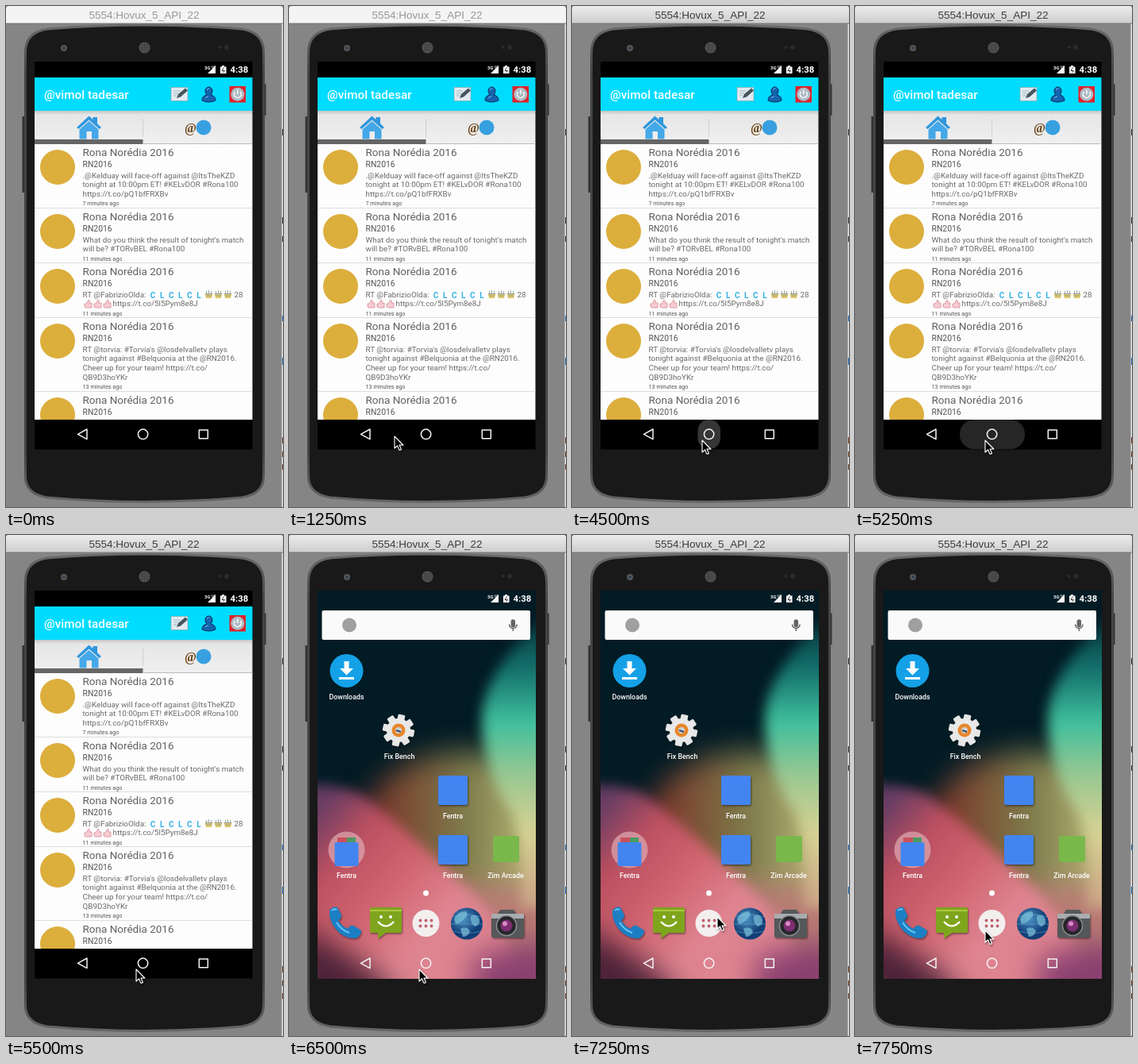
Write an HTML page that moves like this. It is 349 px wide and 631 px high and loops after 8000 ms.

```html
<!DOCTYPE html>
<html lang="en">
<head>
<meta charset="utf-8">
<title>Phone emulator</title>
<style>
html, body { margin: 0; width: 100%; height: 100%; overflow: hidden; background: #858585; }
svg { display: block; width: 349px; height: 631px; }
text { font-family: Roboto, sans-serif; white-space: pre; }
.window-title { font: 13.5px "Liberation Sans", Arial, sans-serif; text-anchor: middle; }
.name { font-size: 13.5px; fill: #616161; }
.handle { font-size: 10.4px; fill: #555; }
.body { font-size: 9.85px; fill: #6a6a6a; }
.time { font-size: 7.25px; fill: #555; }
.label { font-size: 8.9px; font-weight: 500; fill: #fff; text-anchor: middle; }
.blur { filter: url(#soft); }
.haze { filter: url(#softer); }

.active, .home, .tap, .spread, #cursor { animation: 8s step-end infinite; }
.active { animation-name: active; }
.home { animation-name: home; }
.tap { animation-name: tap; }
.spread { animation-name: spread; }
#cursor { animation-name: move; }

@keyframes active { 0% { opacity: 0 } 25%, 100% { opacity: 1 } }
@keyframes home { 0% { opacity: 0 } 81.25%, 100% { opacity: 1 } }
@keyframes tap { 0% { opacity: 0 } 56.25% { opacity: 1 } 59.375%, 100% { opacity: 0 } }
@keyframes spread { 0% { opacity: 0 } 65.625% { opacity: 1 } 68.75%, 100% { opacity: 0 } }
@keyframes move {
  0% { transform: translate(-40px, -40px) }
  3.125% { transform: translate(62px, 352px) }
  6.25% { transform: translate(58px, 602px) }
  9.375% { transform: translate(102px, 501px) }
  12.5% { transform: translate(86px, 547px) }
  15.625% { transform: translate(133px, 542px) }
  18.75% { transform: translate(149px, 543px) }
  21.875% { transform: translate(162px, 545px) }
  25% { transform: translate(164px, 547px) }
  90.625% { transform: translate(183px, 481px) }
  93.75% { transform: translate(165px, 497px) }
  96.875%, 100% { transform: translate(164px, 498px) }
}
</style>
</head>
<body>
<svg viewBox="0 0 349 631">
  <defs>
    <linearGradient id="bar" x2="0" y2="1"><stop stop-color="#ececec"/><stop offset="1" stop-color="#cdcdcd"/></linearGradient>
    <linearGradient id="tabs" x2="0" y2="1"><stop stop-color="#c4c4c4"/><stop offset=".12" stop-color="#e6e6e6"/><stop offset="1" stop-color="#f0f0f0"/></linearGradient>
    <linearGradient id="rim" x2="0" y2="1"><stop stop-color="#6a6a6a"/><stop offset=".1" stop-color="#444"/><stop offset=".9" stop-color="#444"/><stop offset="1" stop-color="#666"/></linearGradient>
    <linearGradient id="olive" gradientUnits="userSpaceOnUse" x1="95" x2="310">
      <stop stop-color="#7c2f28"/><stop offset=".3" stop-color="#7c5538"/><stop offset=".6" stop-color="#7d7c4c"/><stop offset="1" stop-color="#b8b878"/>
    </linearGradient>
    <linearGradient id="aqua" gradientUnits="userSpaceOnUse" x1="0" x2="0" y1="105" y2="480">
      <stop stop-color="#05333c"/><stop offset=".17" stop-color="#14706c"/><stop offset=".35" stop-color="#3fbf9c"/>
      <stop offset=".52" stop-color="#96c791"/><stop offset=".72" stop-color="#d6d294"/><stop offset="1" stop-color="#c99c84"/>
    </linearGradient>
    <linearGradient id="pink" gradientUnits="userSpaceOnUse" x1="36" y1="340" x2="190" y2="480">
      <stop stop-color="#653c64"/><stop offset=".3" stop-color="#b94f60"/><stop offset=".65" stop-color="#d0646f"/><stop offset="1" stop-color="#de8490"/>
    </linearGradient>
    <radialGradient id="globe" cx=".4" cy=".35"><stop stop-color="#4c92c4"/><stop offset="1" stop-color="#123f78"/></radialGradient>
    <pattern id="mesh" width="2" height="2" patternUnits="userSpaceOnUse"><path d="M0 0H1V1H0Z" fill="#222"/></pattern>
    <filter id="soft" x="-50%" y="-50%" width="200%" height="200%" color-interpolation-filters="sRGB"><feGaussianBlur stdDeviation="8"/></filter>
    <filter id="softer" x="-50%" y="-80%" width="200%" height="260%" color-interpolation-filters="sRGB"><feGaussianBlur stdDeviation="18"/></filter>
    <filter id="shade" x="-50%" y="-50%" width="220%" height="220%"><feDropShadow dx="1" dy="1.5" stdDeviation="1.2" flood-opacity=".45"/></filter>
    <clipPath id="screen"><path d="M36 70H310.500V558.500H36Z"/></clipPath>
    <clipPath id="listArea"><path d="M36 174H310.500V521H36Z"/></clipPath>
  </defs>

  <!-- Desktop and emulator window -->
  <rect width="349" height="631" fill="#858585"/>
  <rect x="347.500" y="22" width="1.500" height="609" fill="#e4e4e4"/>
  <path d="M348.500 155V163M348.500 266V274M348.500 290V297" stroke="#333"/>
  <path d="M348.500 390V397M348.500 443V452" stroke="#1769c0"/>
  <path d="M348.500 543V551M348.500 561V568M348.500 577V584" stroke="#6b3a1c"/>
  <path d="M0 22V4Q0 0 4 0H345Q349 0 349 4V22Z" fill="#f4f4f4"/>
  <text class="window-title" x="174" y="15.700" fill="#979797">5554:Hovux_5_API_22</text>
  <g class="active">
    <path d="M0 22V4Q0 0 4 0H345Q349 0 349 4V22Z" fill="url(#bar)"/>
    <text class="window-title" x="174" y="15.700" fill="#3c3c3c">5554:Hovux_5_API_22</text>
  </g>
  <path d="M0 22H349" stroke="#777"/>

  <!-- Phone -->
  <path d="M20.500 139H24V235H20.500ZM324 98.500H327.500V138H324Z" fill="#333"/>
  <path d="M24.500 58Q24.500 33 52 29Q174 19 297 29Q324.500 33 324.500 58V592Q324.500 615 297 619Q174 630 52 619Q24.500 615 24.500 592Z" fill="#191919" stroke="url(#rim)" stroke-width="3"/>
  <circle cx="73" cy="53" r="4" fill="#565656"/><circle cx="73" cy="53" r="1.800" fill="#2b3d55"/>
  <circle cx="174.500" cy="52.500" r="7" fill="#555"/><circle cx="174.500" cy="52.500" r="6" fill="url(#mesh)"/>
  <g fill="#2b2b2b"><circle cx="269.500" cy="52" r="2"/><circle cx="278" cy="52" r="3"/></g>

  <g clip-path="url(#screen)">
    <rect x="36" y="70" width="275" height="489"/>

    <!-- Feed app -->
    <rect x="36" y="90" width="275" height="43" fill="#00dcff"/>
    <text x="48" y="117" font-size="15.300" font-weight="500" fill="#fff">@vimol tadesar</text>
    <g>
      <rect x="208" y="102.500" width="21" height="17" fill="#e2eaf0" stroke="#8aa" stroke-width=".7"/>
      <path d="M211 107H219M211 110H217M211 113H215" stroke="#9bb"/>
      <path d="M215 116L217 111L226 103.500L229 106.500L220 114.500Z" fill="#46555f"/>
    </g>
    <path d="M251 107a4.500 5 0 0 1 9 0q0 3-2 5q6 1 6 7q-8.500 4-17 0q0-6 6-7q-2-2-2-5z" fill="#1563ae" stroke="#0a2d58"/>
    <path d="M253.500 106a2 2.500 0 0 1 3-2M251 116q2-2 4-2" fill="none" stroke="#7db9e8"/>
    <g>
      <rect x="281.500" y="101" width="20.500" height="20.500" fill="#e0222c"/>
      <circle cx="291.800" cy="111.200" r="8.500" fill="#aebbc4"/>
      <path d="M288.500 108a4.500 4.500 0 1 0 6.600 0M291.800 105.500V111" fill="none" stroke="#fff" stroke-width="1.500"/>
    </g>
    <rect x="36" y="132" width="275" height="42" fill="url(#tabs)"/>
    <path d="M172.500 142V165" stroke="#cfcfcf"/>
    <path d="M36 168H172.500V174H36Z" fill="#666"/>
    <path d="M172 173.500H311" stroke="#bbb"/>
    <path d="M89 153L104.500 138.500L109.500 143V140H115V148L120 153L117.500 155L104.500 143.500L91.500 155Z" fill="#2f97dd"/>
    <path d="M92.500 155.500L104.500 145L116.500 155.500V167.500H108V158H101.500V167.500H92.500Z" fill="#45a8e8"/>
    <text x="225" y="158.500" font-size="16" font-weight="700" fill="#6b4010" style="font-family:'Liberation Serif',serif">@</text>
    <circle cx="249" cy="153" r="9.500" fill="#38a0e0"/>
    <rect x="36" y="174" width="275" height="347" fill="#fdfdfd"/>
    <g id="feed" clip-path="url(#listArea)"></g>
    <rect class="tap" x="158.500" y="521" width="28.500" height="37" rx="14" fill="#363636"/>
    <rect class="spread" x="132" y="521" width="82" height="37" rx="18" fill="#262626"/>

    <!-- Home screen -->
    <g class="home">
      <rect x="36" y="70" width="275" height="489" fill="#021b24"/>
      <g class="haze">
        <ellipse cx="218" cy="385" rx="132" ry="112" fill="url(#olive)"/>
        <path d="M190 440H360V620H190Z" fill="#b87a74"/>
      </g>
      <path class="blur" d="M345 85Q240 165 243 240Q247 305 282 350Q300 400 290 470H345Z" fill="url(#aqua)"/>
      <path class="blur" d="M0 318Q60 308 95 330Q160 380 235 455Q290 510 300 600H0Z" fill="url(#pink)"/>
      <path class="haze" d="M230 535Q280 510 350 515V620H230Z" fill="#8a4070"/>
      <path class="haze" d="M0 490Q60 510 130 570V620H0Z" fill="#4c2238"/>
      <rect x="41.500" y="95" width="262.500" height="37" rx="2" fill="#fafafa"/>
      <circle cx="76" cy="113.500" r="9" fill="#a0a0a0"/>
      <g fill="none" stroke="#666" stroke-width="1.500">
        <rect x="280.300" y="107" width="4" height="8.500" rx="2" fill="#666"/>
        <path d="M277.500 112.500a4.800 5 0 0 0 9.600 0M282.300 118V121"/>
      </g>
      <circle cx="72.500" cy="171" r="21" fill="#14a1e8"/>
      <path d="M69.500 159H75.500V168H81L72.500 176.500L64 168H69.500ZM63 179H82V182H63Z" fill="#fff"/>
      <g id="gear" transform="translate(138 246)" filter="url(#shade)"></g>
      <g fill="#4285f0" filter="url(#shade)">
        <rect x="188" y="303" width="37" height="37" rx="2"/>
        <rect x="188" y="378" width="37" height="37" rx="2"/>
      </g>
      <circle cx="72.500" cy="396.500" r="23" fill="#dca4ae" opacity=".75"/>
      <path d="M61 381H73V389H61Z" fill="#c9505e"/><path d="M73 381H84V389H73Z" fill="#4c9a62"/>
      <rect x="57.500" y="387" width="30" height="30" rx="2" fill="#4285f0"/>
      <rect x="257" y="379" width="33" height="33" rx="3" fill="#79b84a"/>
      <g id="labels"></g>
      <circle cx="172.500" cy="451" r="3.500" fill="#fff"/>

      <g filter="url(#shade)">
        <path d="M51 473Q55 467 61 469L66 479Q66 483 62 485Q66 493 74 496Q77 491 81 492L91 498Q91 505 84 508Q68 508 58 495Q50 484 51 473Z" fill="#1b7fc4"/>
        <path d="M54 473Q57 470 60 472M60 488Q66 498 76 501" fill="none" stroke="#66c4f4" stroke-width="2"/>
        <path d="M104 469H140Q142 469 142 471V499Q142 501 140 501H122L112 508V501H104Q102 501 102 499V471Q102 469 104 469Z" fill="#7fa51e"/>
        <path d="M102 473H142" stroke="#a9c940" stroke-width="2"/>
      </g>
      <g fill="#fff"><circle cx="116" cy="481" r="2"/><circle cx="128" cy="481" r="2"/></g>
      <path d="M112 487Q122 498 132 487" fill="none" stroke="#fff" stroke-width="2.200"/>
      <circle cx="172.500" cy="489" r="17" fill="#f3efef"/>
      <g id="dots" fill="#c0606c"></g>
      <circle cx="224" cy="489.500" r="20" fill="url(#globe)"/>
      <path d="M208 484Q213 473 223 474Q227 479 221 483Q217 489 210 490ZM229 480Q236 476 240 484Q241 492 234 493Q228 489 229 480ZM216 496Q224 492 228 499Q226 506 219 506Z" fill="#7cc4dc" opacity=".7"/>
      <path d="M206 481Q224 475 242 481M204 490H244M206 499Q224 504 242 499" fill="none" stroke="#8fcbe4" stroke-width=".7" opacity=".6"/>
      <g filter="url(#shade)">
        <path d="M256 477H263L266 472H283L286 477H294Q296 477 296 479V505Q296 507 294 507H257Q255 507 255 505V479Z" fill="#55585a"/>
        <path d="M255 477H296V483H255Z" fill="#a9adaf"/>
        <circle cx="274" cy="492" r="12.500" fill="#25272a" stroke="#8b8e90" stroke-width="1.500"/>
        <circle cx="274" cy="492" r="7.500" fill="#7c2d70"/><circle cx="272" cy="489.500" r="3" fill="#d58bc6"/>
      </g>
    </g>

    <!-- Status and navigation bars -->
    <g fill="#fff">
      <text x="250" y="79.500" font-size="6" font-weight="700">3G</text>
      <path d="M264 75V85H254Z"/><path d="M258 75.500L264 75V85L261 82Z" opacity=".4"/>
      <path d="M272 75H275V76.500H277.500V85H270V76.500H272Z"/>
      <text x="282.500" y="84.300" font-size="11.300" font-weight="700">4:38</text>
    </g>
    <path d="M274.500 77.500L272 81.500H275.500L273.500 84" fill="none" stroke="#222" stroke-width=".9"/>
    <g fill="none" stroke="#f4f4f4" stroke-width="1.500" stroke-linejoin="round">
      <path d="M90.500 539.300L102 533V545.600Z"/><circle cx="172.600" cy="539.300" r="6.200"/>
      <rect x="243.300" y="534" width="11" height="10.800"/>
    </g>
  </g>
  <g id="cursor"><path d="M0 0V15L3.500 11.800L6 17.400L8.400 16.400L6 11H10.800Z" stroke="#fff" stroke-width="1.100" stroke-linejoin="round" filter="url(#shade)"/></g>
</svg>
<script>
const $ = id => document.getElementById(id);
const text = (cls, x, y, str) => `<text class="${cls}" x="${x}" y="${y}">${str}</text>`;
const repeat = (n, draw) => Array.from({ length: n }, (_, i) => draw(i)).join('');

const posts = [
  [174, 7, ['.@Kelduay will face-off against @ItsTheKZD', 'tonight at 10:00pm ET! #KELvDOR #Rona100', 'https://t.co/pQ1bfFRXBv']],
  [255, 11, ["What do you think the result of tonight's match", 'will be? #TORvBEL #Rona100']],
  [324, 11, ['RT @FabrizioOlda:', '']],
  [393, 13, ["RT @torvia: #Torvia's @losdelvalletv plays", 'tonight against #Belquonia at the @RN2016.', 'Cheer up for your team! https://t.co/', 'QB9D3hoYKr']],
  [486, 15, ['']]
];

const post = ([y, age, lines]) =>
  `<path d="M36 ${y - .5}H311" stroke="#ddd"/><circle cx="65" cy="${y + 29}" r="22" fill="#dcae3c"/>` +
  text('name', 96.5, y + 14.8, 'Rona Norédia 2016') +
  text('handle', 96.5, y + 28.8, 'RN2016') +
  lines.map((s, i) => text('body', 96.5, y + 42.5 + 11.8 * i, s)).join('') +
  text('time', 96.5, y + 42 + 11.8 * lines.length, age + ' minutes ago');

const cake = i => `<g transform="translate(${250 + 12 * i} 358)">
  <path d="M.5 4H10.500L9 10H2Z" fill="#e3c964"/><path d="M1 4.500H10M2 7H9" stroke="#8f9ba0"/>
  <path d="M2.500 1V4M5.500 0V4M8.500 1V4" stroke="#9aa9a4"/></g>`;
const thumb = i => `<path transform="translate(${98 + 12 * i} 370)" d="M1 5H3L6 0Q8 1 7 4H10V10H3L1 9Z" fill="#f6cdd2" stroke="#d98c98" stroke-width=".8"/>`;

const emoji = repeat(6, i => `<text x="${185 + 11.6 * i}" y="367.500" font-size="10" font-weight="700" fill="#35b2e6" text-anchor="middle">${'CL'[i % 2]}</text>`)
  + repeat(3, cake) + repeat(3, thumb)
  + text('body', 287.5, 366.5, '28') + text('body', 134.5, 378.3, 'https://t.co/5l5Pym8e8J');
$('feed').innerHTML = posts.map(post).join('') + emoji;

$('gear').innerHTML = repeat(8, i => `<rect x="-4.500" y="-20" width="9" height="10" rx="1.500" fill="#e6e6e6" transform="rotate(${45 * i + 12})"/>`)
  + '<circle r="15" fill="#e9e9e9"/><circle r="8.500" fill="#e8862a"/><circle r="4" fill="#c9d3da"/><path d="M-3 0L3 2" stroke="#445" stroke-width="2"/>';

$('labels').innerHTML = [
  [72.5, 207, 'Downloads'], [139, 282, 'Fix Bench'], [206.5, 357, 'Fentra'],
  [206.5, 432, 'Fentra'], [72.5, 432, 'Fentra'], [273, 432, 'Zim Arcade']
].map(l => text('label', ...l)).join('');

$('dots').innerHTML = repeat(6, i => `<circle cx="${165.5 + i % 3 * 7}" cy="${485.5 + Math.floor(i / 3) * 7}" r="1.900"/>`);
</script>
</body>
</html>
```
